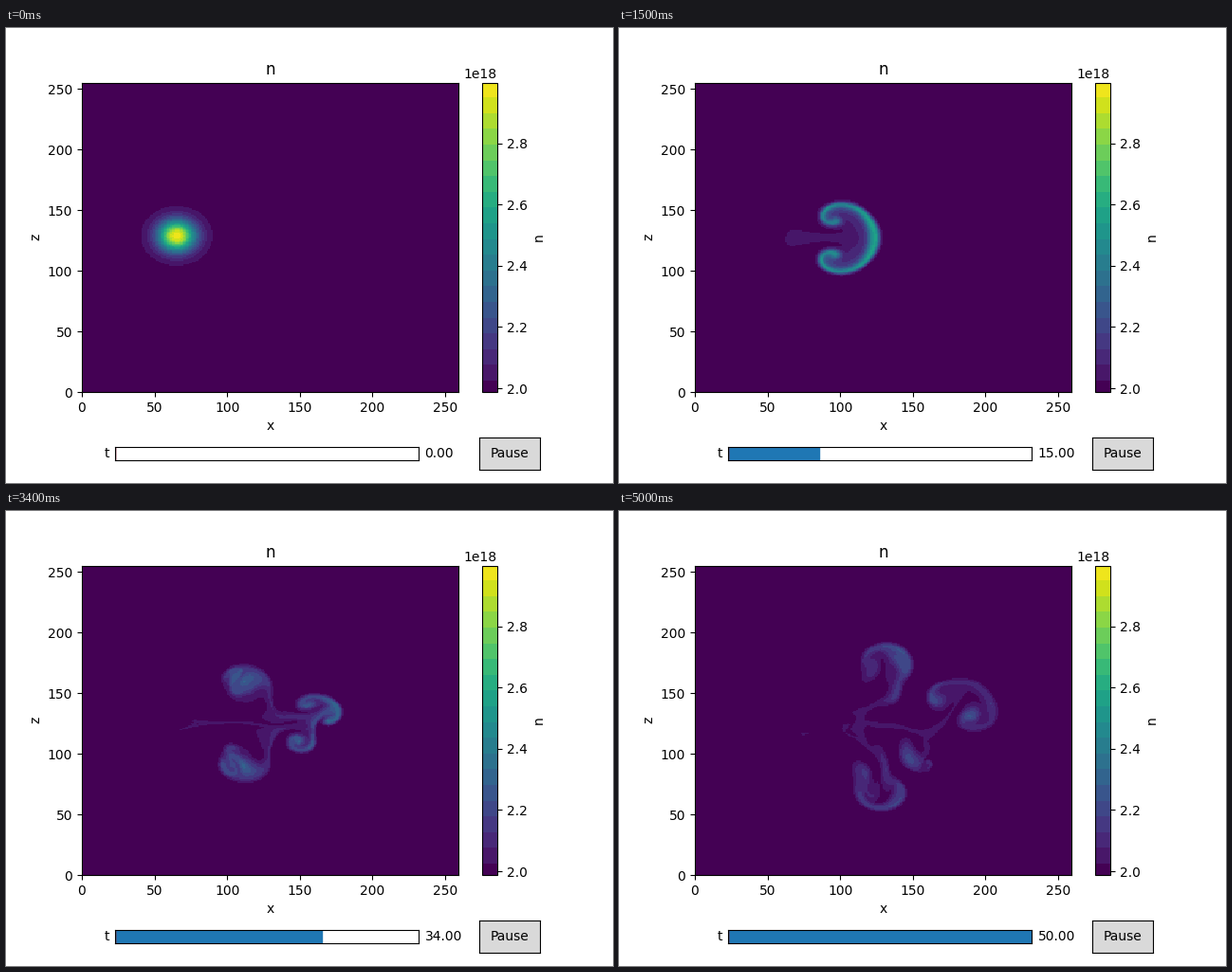
Write a matplotlib script that moves like this. It is 640 px wide and 480 px high and loops after 5.1 s.

```python
import numpy as np
import matplotlib.pyplot as plt
from matplotlib.animation import FuncAnimation
from matplotlib.cm import ScalarMappable
from matplotlib.colors import ListedColormap, Normalize
from matplotlib.patches import Rectangle

NX, NZ, H = 260, 256, 0.3           # grid cells and cell size
FRAMES, DT, SUBSTEPS = 51, 6.25, 8  # 50 time units between frames
RHO = 9.23e-4                       # gyroradius in metres
CURV, SHEATH = 2 * RHO / 1.5, RHO / 10
N0 = 2e18

# Region in which the blob moves; outside it the plasma is at rest
X0, X1, Z0, Z1 = 26, 238, 36, 212


def window(f, dx=0, dz=0):
    return f[..., X0 + dx:X1 + dx, Z0 + dz:Z1 + dz]


# Poisson solver: sine modes in x, Fourier modes in z
j = np.arange(1, NX + 1)
SINE = np.sin(np.pi * np.outer(j, j) / (NX + 1)).astype(np.float32)
kz = 2 * np.pi * np.arange(NZ // 2 + 1) / (NZ * H)
eigen = (2 - 2 * np.cos(np.pi * j / (NX + 1)))[:, None] / H**2 + kz**2
INVERSE = np.repeat(-2 / (NX + 1) / eigen, 2, axis=1).astype(np.float32)


def potential(omega):
    modes = np.fft.rfft(omega, axis=1).astype(np.complex64).view(np.float32)
    modes = SINE @ ((SINE @ modes) * INVERSE)
    return np.fft.irfft(modes.view(np.complex64), NZ, axis=1).astype(np.float32)


def upwind(f, vel, dx, dz):
    """Velocity times the third-order WENO derivative along one axis."""
    far_l, left, mid, right, far_r = (window(f, s * dx, s * dz)
                                      for s in (-2, -1, 0, 1, 2))
    bend = right - 2 * mid + left
    up = np.where(vel > 0, mid - 2 * left + far_l, far_r - 2 * right + mid)
    ratio = (1e-8 + up * up) / (1e-8 + bend * bend)
    weight = np.sign(vel) / (1 + 2 * ratio * ratio)
    return vel * (0.5 / H) * (right - left - weight * (bend - up))


def slope_z(f):
    near = window(f, 0, 1) - window(f, 0, -1)
    far = window(f, 0, 2) - window(f, 0, -2)
    return (8 * near - far) / (12 * H)


def rate(state):
    """Time derivative of density (above background) and vorticity."""
    dens, omega = state
    phi = potential(omega)
    vx = slope_z(phi)
    vz = (window(phi, -1) - window(phi, 1)) / (2 * H)
    out = np.stack([(1 + dens) * phi, phi]) * np.float32(SHEATH)
    drive = CURV * slope_z(dens)
    inner = window(out)
    inner -= upwind(state, vx, 1, 0) + upwind(state, vz, 0, 1)
    inner[0] += drive
    inner[1] += drive / (1 + window(dens))
    return out


def advance(s):
    a = s + DT * rate(s)
    b = 0.75 * s + 0.25 * (a + DT * rate(a))
    return s / 3 + (b + DT * rate(b)) * (2 / 3)


def simulate():
    x, z = np.arange(NX)[:, None], np.arange(NZ)[None, :]
    blob = 0.5 * np.exp(-((x - 64.8) / 12.9)**2 - ((z - 128) / 12.8)**2)
    state = np.stack([blob, np.zeros_like(blob)]).astype(np.float32)
    fields = []
    for k in range(FRAMES):
        fields.append(N0 * (1 + state[0, :-1, :-1].T.astype(float)))
        if k < FRAMES - 1:
            for _ in range(SUBSTEPS):
                state = advance(state)
    return fields


def banded_viridis(lo, hi, edges):
    """Viridis in flat bands between the given edges."""
    bounds = np.array([lo, *edges, hi])
    mids = (bounds[:-1] + bounds[1:]) / 2
    mids[0] = lo
    shades = plt.get_cmap("viridis")((mids - lo) / (hi - lo))
    fine = np.linspace(lo, hi, 1024)
    return ListedColormap(shades[np.searchsorted(edges, fine)])


fields = simulate()

LO, HI = 1.988e18, 2.998e18
cmap = banded_viridis(LO, HI, np.linspace(2.025e18, 2.95e18, 19))
norm = Normalize(LO, HI)

fig, ax = plt.subplots(figsize=(6.4, 4.8), dpi=100)
fig.subplots_adjust(bottom=0.2)
bar = fig.colorbar(ScalarMappable(norm, cmap), ax=ax)
bar.set_label("n")
image = ax.imshow(fields[0], cmap=cmap, norm=norm, origin="lower", aspect="auto",
                  extent=(0, NX - 1, 0, NZ - 1), interpolation="nearest")
ax.set(title="n", xlabel="x", ylabel="z")


def widget_axes(rect, color):
    w = fig.add_axes(rect, facecolor=color)
    w.set(xticks=[], yticks=[])
    return w


slider = widget_axes([0.18, 0.05, 0.5, 0.03], "white")
slider.set_xlim(0, FRAMES - 1)
fill = slider.add_patch(Rectangle((0, 0), 0, 1, color="C0", lw=1))
slider.axvline(0, color="r", lw=1)
slider.text(-0.02, 0.5, "t", transform=slider.transAxes, ha="right", va="center")
value = slider.text(1.02, 0.5, "", transform=slider.transAxes, va="center")

button = widget_axes([0.78, 0.03, 0.1, 0.07], "0.85")
button.text(0.5, 0.5, "Pause", transform=button.transAxes, ha="center", va="center")


def draw(k):
    image.set_data(fields[k])
    fill.set_width(k)
    value.set_text(f"{k:.2f}")
    return image, fill, value


anim = FuncAnimation(fig, draw, frames=FRAMES, interval=100, repeat=True,
                     repeat_delay=0, blit=False)
plt.show()
```
